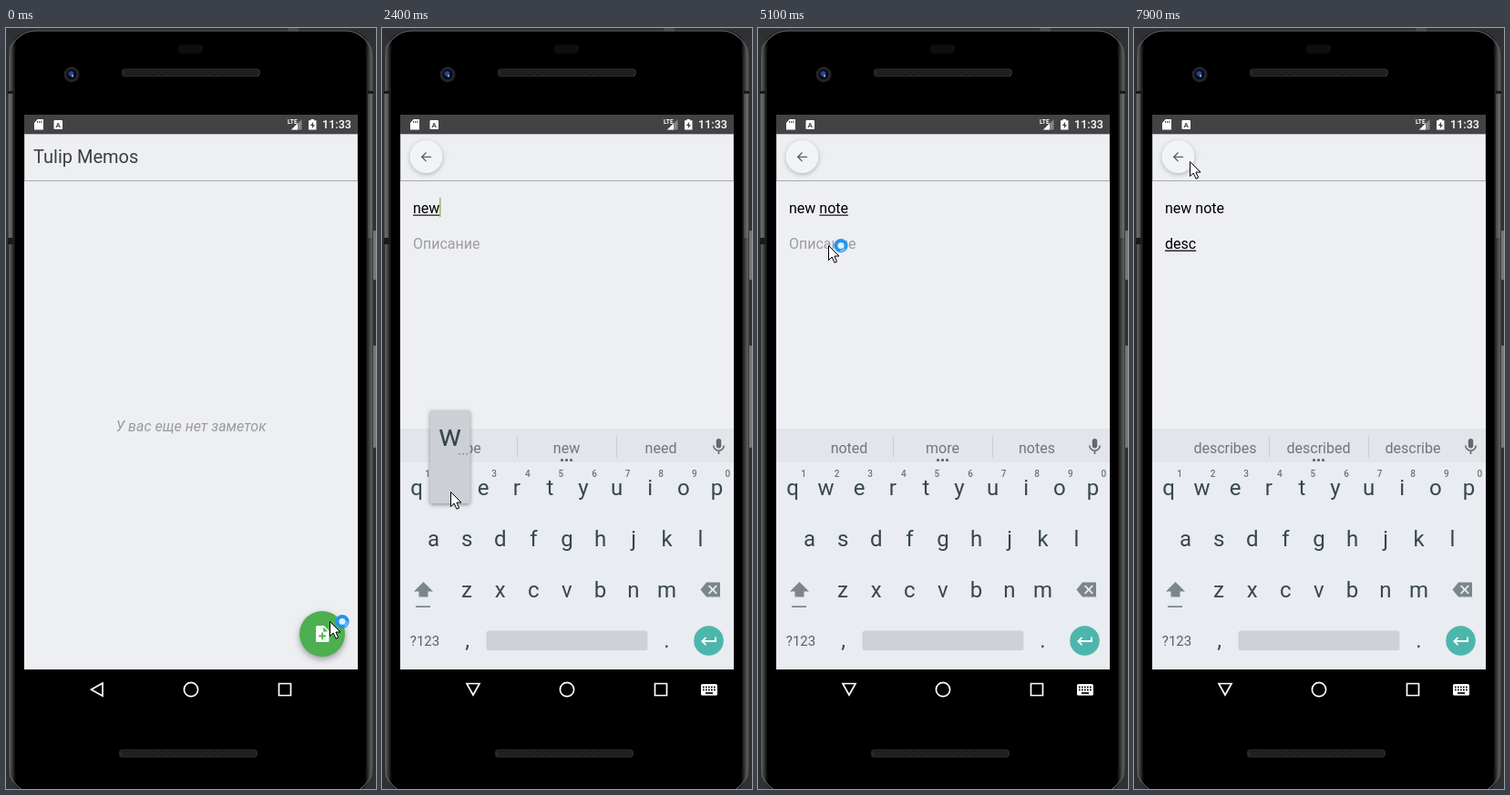
These frames come from a looping animation (406 px wide and 834 px high, 8 s). An HTML page with a canvas:

```html
<!DOCTYPE html>
<html lang="ru">
<head>
<meta charset="utf-8">
<title>Notes demo</title>
<style>
  html, body { margin: 0; width: 100%; height: 100%; overflow: hidden; background: #303134; }
  canvas { display: block; width: 406px; height: 834px; }
</style>
</head>
<body>
<canvas id="stage" width="406" height="834"></canvas>
<script>
const ctx = document.getElementById('stage').getContext('2d');
const LOOP = 8000, STEP = 100;
const PAGE = '#eeeff3', INK = '#37474f', ICON = '#7b868b';
const APP_NAME = 'Tulip Memos';
const FOCUS_NOTE = 5150;

// Key presses: time, character
const presses = [
  [1400, 'n'], [1900, 'e'], [2300, 'w'], [2800, ' '], [3100, 'n'], [3500, 'o'], [4200, 't'], [4500, 'e'],
  [6300, 'd'], [6600, 'e'], [6800, 's'], [7100, 'c']
];
// Suggestion strip: time, left, middle, right
const suggestions = [
  [0, '', '', ''], [1600, 'in', 'new', 'not'], [2100, 'be', 'new', 'need'], [2500, 'now', 'new', 'news'],
  [2900, '', '', ''], [3300, 'in', 'new', 'not'], [3700, 'on', 'not', 'now'], [4400, 'or', 'not', 'note'],
  [4700, 'noted', 'more', 'notes'], [5300, 'new', 'Stars', ''], [6500, 'so', 'do', 'did'],
  [6800, 'see', 'de', 'dear'], [7000, 'des', 'desk', 'does'], [7300, 'describes', 'described', 'describe']
];
// Pointer stops: time, x, y
const pointer = [
  [0, 355, 650], [800, 355, 650], [1250, 276, 612], [1500, 276, 612], [1800, 109, 508], [2050, 109, 508],
  [2250, 75, 508], [2450, 75, 508], [2700, 190, 660], [2900, 190, 660], [3100, 287, 603], [3300, 287, 603],
  [3450, 331, 508], [3650, 331, 508], [3950, 176, 501], [4250, 176, 501], [4450, 109, 506], [4650, 109, 506],
  [5000, 77, 238], [5200, 77, 238], [5450, 130, 557], [5800, 140, 588], [6200, 125, 562], [6400, 125, 562],
  [6550, 112, 506], [6650, 112, 506], [6800, 92, 562], [6900, 92, 562], [7080, 166, 614], [7300, 166, 614],
  [7750, 61, 146], [8000, 61, 146]
];
const busySpans = [[0, 200], [3900, 4200], [4900, 5300]];
const rows = [
  { keys: 'qwertyuiop', x: 38, baseline: 512 },
  { keys: 'asdfghjkl', x: 56.5, baseline: 568 },
  { keys: 'zxcvbnm', x: 93, baseline: 624 }
];

const clamp = v => Math.max(0, Math.min(1, v));
const ease = v => { v = clamp(v); return v * v * (3 - 2 * v); };
const latest = (list, t) => list.filter(item => item[0] <= t).pop();

function rect(x, y, w, h, fill, r = 0) {
  ctx.fillStyle = fill;
  ctx.beginPath();
  ctx.roundRect(x, y, w, h, r);
  ctx.fill();
}
function circle(x, y, r, fill) {
  ctx.fillStyle = fill;
  ctx.beginPath();
  ctx.arc(x, y, r, 0, 7);
  ctx.fill();
}
function ring(x, y, r, color, width) {
  ctx.strokeStyle = color;
  ctx.lineWidth = width;
  ctx.beginPath();
  ctx.arc(x, y, r, 0, 7);
  ctx.stroke();
}
function fillPath(d, color) {
  ctx.fillStyle = color;
  ctx.fill(new Path2D(d), 'evenodd');
}
function strokePath(d, color, width) {
  ctx.strokeStyle = color;
  ctx.lineWidth = width;
  ctx.stroke(new Path2D(d));
}
function text(s, x, y, size, color, align = 'left', style = '') {
  ctx.font = `${style} ${size}px Roboto, sans-serif`;
  ctx.textAlign = align;
  ctx.fillStyle = color;
  ctx.fillText(s, x, y);
}
function withShadow(blur, dy, alpha, draw) {
  ctx.save();
  ctx.shadowColor = `rgba(0,0,0,${alpha})`;
  ctx.shadowBlur = blur;
  ctx.shadowOffsetY = dy;
  draw();
  ctx.restore();
}
function gradient(x0, y0, x1, y1, ...stops) {
  const g = ctx.createLinearGradient(x0, y0, x1, y1);
  stops.forEach(([at, color]) => g.addColorStop(at, color));
  return g;
}

function grille(x, y, h) {
  rect(x, y, 152, h, '#292929', 4);
  for (let i = 0; i < 49; i++) {
    for (let j = 0; j < 3; j++) rect(x + 3 + i * 3 + (j % 2) * 1.5, y + 1.5 + j * 2.3, 1.4, 1.2, '#090909');
  }
}

function drawPhone() {
  rect(0, 0, 406, 834, '#303134');
  rect(402, 222, 4, 54, '#777', 1);
  rect(402, 348, 4, 112, '#777', 1);
  const rim = gradient(2, 0, 404, 0, [0, '#111'], [0.006, '#58595a'], [0.013, '#303132'], [0.022, '#000'],
    [0.975, '#000'], [0.984, '#303132'], [0.993, '#606162'], [1, '#111']);
  rect(2, 2, 401, 838, rim, 30);
  ctx.strokeStyle = '#555658';
  ctx.lineWidth = 1.3;
  ctx.beginPath();
  ctx.roundRect(3.5, 3, 398, 836, 29);
  ctx.stroke();
  rect(10, 9, 385, 826, '#000', 25);
  for (const x of [2, 397]) {
    rect(x, 72, 5, 158, 'rgba(150,150,150,.25)');
    rect(x, 69, 6, 3, '#191919');
  }
  rect(2, 230, 6, 7, '#191919');
  rect(309, 0, 12, 4, '#4a4a4b');
  rect(189, 18, 27, 10, '#0e0e0e', 4);
  circle(72, 51, 8.5, '#242428');
  circle(72, 51, 5.5, '#080c1c');
  circle(71.5, 50, 2.8, '#24489a');
  circle(73, 52.5, 1.2, '#93a9dc');
  grille(127, 44.5, 9);
  grille(124, 790.5, 9);
}

function drawStatusBar() {
  rect(20, 95, 366, 21, '#444344');
  fillPath('M34.5 100H41V111.5H31V104ZM34 102V104H35V102ZM36 102V104H37V102ZM38 102V104H39V102Z', '#fff');
  rect(52.5, 101, 9.5, 10, '#fff', 1);
  text('A', 57.3, 109, 8, '#444', 'center', 'bold');
  text('LTE', 309, 105, 6.5, '#fff', 'left', 'bold');
  fillPath('M324.5 100V111.5H313Z', '#858585');
  fillPath('M320 104.5V111.5H313Z', '#fff');
  fillPath('M334.5 100H338V101.3H340.5V111.5H332V101.3H334.5ZM337 103L334 107H336V110L339 106H337Z', '#fff');
  text('11:33', 379, 110.3, 12.6, '#fff', 'right', '500');
}

function drawToolbar() {
  rect(20, 116, 366, 587, PAGE);
  rect(20, 116, 366, 1, '#bdbabf');
  rect(20, 117, 1, 50, '#c9cacd');
  rect(385, 117, 1, 50, '#c9cacd');
  rect(20, 167, 366, 1, '#a9aaac');
}

function drawHome(t) {
  drawToolbar();
  text(APP_NAME, 30, 148, 20, '#3d3f42');
  text('У вас еще нет заметок', 203, 442, 16, '#9a9b9e', 'center', 'italic');
  withShadow(7, 3, 0.35, () => circle(347, 664, 25, '#4caf50'));
  if (t >= 300) circle(347, 664, 25 * clamp((t - 200) / 250), 'rgba(255,255,255,.22)');
  fillPath('M342 655H349L354.5 660.5V671.5Q354.5 673 353 673H341.5Q340 673 340 671.5V656.5Q340 655 342 655Z' +
    'M348.2 656.5V661.5H353ZM346.3 662.5V665.5H343.3V667.3H346.3V670.3H348.1V667.3H351.1V665.5H348.1V662.5Z', '#f4fff4');
}

// Text with its composing word underlined and an optional caret.
function drawField(value, x, baseline, underlined, caret) {
  text(value, x, baseline, 16, '#000');
  const wordStart = value.lastIndexOf(' ') + 1;
  const from = x + ctx.measureText(value.slice(0, wordStart)).width;
  const to = x + ctx.measureText(value).width;
  if (underlined && to > from) rect(from, baseline + 1.6, to - from, 1.1, '#000');
  if (caret) rect(to - 0.3, baseline - 17, 1.5, 21, '#9fb750');
}

function drawEditor(t) {
  drawToolbar();
  withShadow(5, 1.5, 0.25, () => circle(48.5, 141, 18, '#f2f3f6'));
  strokePath('M54 141.3H44M48.5 136.5L43.7 141.3L48.5 146.1', '#5b5d60', 1.3);

  const typed = presses.filter(([at]) => at <= t);
  const join = list => list.map(([, key]) => key).join('');
  const title = join(typed.filter(([at]) => at < FOCUS_NOTE));
  const note = join(typed.filter(([at]) => at > FOCUS_NOTE));
  const inNote = t >= FOCUS_NOTE;
  const lastInput = Math.max(600, inNote ? FOCUS_NOTE : 0, ...typed.map(([at]) => at));
  const caret = (t - lastInput) % 1000 <= 520;
  if (!title) text('Заголовок', 34, 203, 16, '#9c9da0');
  if (!note) text('Описание', 34, 242, 16, '#9c9da0');
  drawField(title, 34, 203, !inNote, caret && !inNote);
  drawField(note, 34, 242, true, caret && inNote);
}

function drawPopup(key) {
  const row = rows.find(r => r.keys.includes(key));
  if (!row) return;
  const x = row.x + row.keys.indexOf(key) * 36.6, y = row.baseline;
  withShadow(4, 1.5, 0.4, () => rect(x - 22, y - 93, 44, 102, '#ccd0d5', 2));
  text(key, x, y - 54, 33, INK, 'center');
  for (let i = 0; i < 3; i++) rect(x + 9.5 + i * 4, y - 46, 2, 1.6, '#92989c');
}

function drawKeyboard(t) {
  rect(20, 439, 366, 264, '#e9ecf0');
  rect(20, 439, 366, 37, '#e2e5e9');
  rect(148, 447, 1, 24, '#cbced2');
  rect(257, 447, 1, 24, '#cbced2');
  const words = latest(suggestions, t).slice(1);
  words.forEach((word, i) => text(word, [100, 202.5, 306][i], 465.5, 16, '#70777b', 'center'));
  if (words[2]) for (let i = -1; i < 2; i++) circle(202.5 + i * 5, 473.5, 1.5, '#50585c');
  rect(366.8, 450, 5.4, 10.5, '#626a6f', 2.7);
  strokePath('M363.8 457.5A5.7 5.7 0 0 0 375.2 457.5M369.5 463V467', '#626a6f', 1.6);

  for (const { keys, x, baseline } of rows) {
    [...keys].forEach((key, i) => {
      text(key, x + i * 36.6, baseline, 24, INK, 'center');
      if (keys.length === 10) text((i + 1) % 10, x + 12 + i * 36.6, 492, 10, '#69757b', 'center', '500');
    });
  }
  fillPath('M45.5 607L56 617.5H50.5V623.5H40.5V617.5H35Z', ICON);
  rect(37, 633.3, 16, 1.7, ICON);
  fillPath('M356 607.5H371V623.5H356L349.5 615.5ZM358 611.8L361.6 615.5L358 619.2L359.3 620.4L362.9 616.8' +
    'L366.5 620.4L367.8 619.2L364.2 615.5L367.8 611.8L366.5 610.6L362.9 614.2L359.3 610.6Z', ICON);
  text('?123', 47, 677, 15, '#526067', 'center');
  text(',', 93.5, 679, 24, INK, 'center');
  text('.', 312.5, 679, 24, INK, 'center');
  const press = latest(presses, t);
  const held = press && t - press[0] < 180 ? press[1] : '';
  rect(114.5, 660.5, 177, 21.5, held === ' ' ? '#b9bec4' : '#cdd1d6', 3);
  circle(358.5, 671.5, 16.3, '#4db6ac');
  strokePath('M366 667.5V672H351.5M355.5 667.8L351.3 672L355.5 676.2', '#fff', 1.8);
  if (held) drawPopup(held);
}

function drawNavBar(keyboardOpen) {
  rect(20, 703, 366, 42, '#000');
  strokePath(keyboardOpen ? 'M93 718.5H107L100 731Z' : 'M106 718V732L93.5 725Z', '#fff', 1.7);
  ring(203, 725, 7.6, '#fff', 1.7);
  strokePath('M299.5 718.5H312.5V731.5H299.5Z', '#fff', 1.7);
  if (!keyboardOpen) return;
  rect(350, 719, 18, 12.5, '#fff', 1.5);
  for (let i = 0; i < 5; i++) {
    rect(352 + i * 3, 721.5, 1.7, 1.7, '#000');
    rect(352 + i * 3, 724.5, 1.7, 1.7, '#000');
  }
  rect(355, 728, 8, 1.7, '#000');
}

function drawPointer(t) {
  const next = pointer.findIndex(stop => stop[0] > t);
  const [t0, x0, y0] = pointer[next - 1], [t1, x1, y1] = pointer[next];
  const k = ease((t - t0) / (t1 - t0));
  const x = x0 + (x1 - x0) * k, y = y0 + (y1 - y0) * k;
  ctx.save();
  ctx.translate(x, y);
  const arrow = 'M.5 .5V16.5L4.2 13L7 19.2L9.6 18L6.9 12H12Z';
  fillPath(arrow, '#fff');
  strokePath(arrow, '#000', 1);
  if (busySpans.some(([from, to]) => t >= from && t < to)) {
    circle(14, 0.5, 4, '#d9efff');
    ring(14, 0.5, 5.6, '#2494ec', 4);
    const angle = t / 1000 * Math.PI * 2;
    ctx.strokeStyle = '#75c2fb';
    ctx.lineWidth = 2;
    ctx.beginPath();
    ctx.arc(14, 0.5, 5.6, angle, angle + 1.1);
    ctx.stroke();
  }
  ctx.restore();
}

function draw(t) {
  drawPhone();
  drawStatusBar();
  ctx.save();
  ctx.beginPath();
  ctx.rect(20, 116, 366, 587);
  ctx.clip();
  const open = ease((t - 350) / 250);
  if (open < 1) drawHome(t);
  if (open > 0) {
    ctx.save();
    ctx.globalAlpha = open;
    ctx.translate(0, 45 * (1 - open));
    drawEditor(t);
    ctx.restore();
  }
  const rise = ease((t - 700) / 350);
  if (rise > 0) {
    ctx.save();
    ctx.translate(0, 264 * (1 - rise));
    drawKeyboard(t);
    ctx.restore();
  }
  ctx.restore();
  drawNavBar(rise > 0);
  drawPointer(t);
}

function tick() {
  const t = performance.now() % LOOP;
  draw(Math.floor(t / STEP) * STEP);
  requestAnimationFrame(tick);
}
tick();
</script>
</body>
</html>
```
